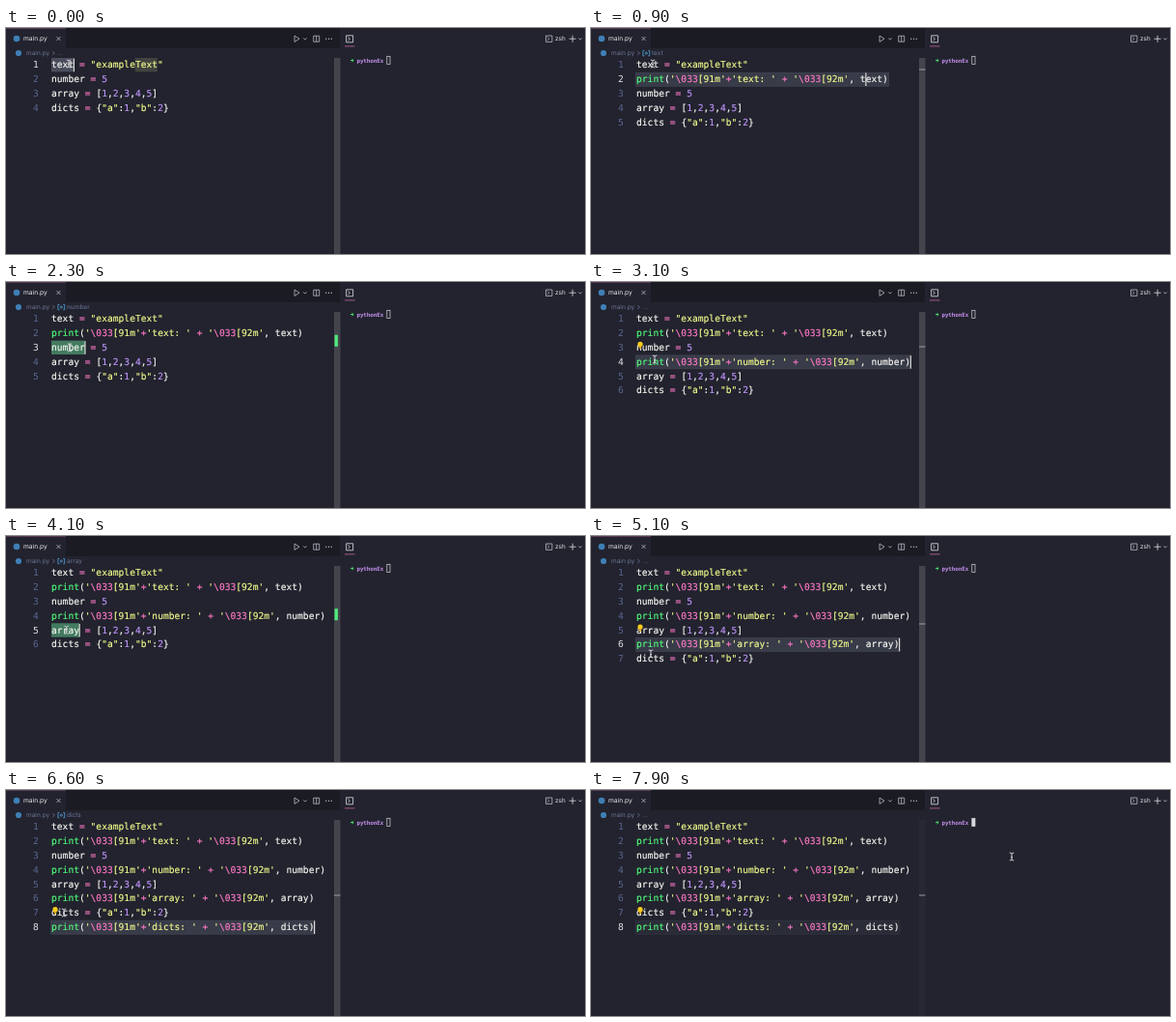
Recreate the animation shown at these times as an HTML page. Size 600 by 234 pixels, loop 8 s.

```html
<!DOCTYPE html>
<html lang="en">
<head>
<meta charset="utf-8">
<title>Editor print helper</title>
<style>
html, body { margin: 0; width: 100%; height: 100%; overflow: hidden; background: #22232e; }
svg { display: block; width: 600px; height: 234px; }
text { white-space: pre; text-rendering: geometricPrecision; }
.code { font: 9.63px "DejaVu Sans Mono", monospace; stroke-width: .15; }
.ui { font: 6.7px Inter, "Open Sans", sans-serif; fill: #e4e4e8; }
.dim { font-size: 6.5px; fill: #6c7497; }
.term { font: bold 5.8px "DejaVu Sans Mono", monospace; fill: #c792f0; }
.icon { fill: none; stroke: #b9bac4; stroke-width: .8; }
</style>
</head>
<body>
<svg id="stage" viewBox="0 0 600 234">
  <rect width="600" height="234" fill="#22232e"/>
  <rect width="346" height="21" fill="#1a1b23"/>
  <rect width="62" height="21" fill="#22232e"/>
  <rect width="62" height="1" fill="#5c3a55"/>
  <rect id="scroll" x="340" y="31" width="6.5" height="203"/>

  <circle cx="11" cy="11" r="3.3" fill="#3f7fb5"/>
  <text class="ui" x="18" y="13.4">main.py</text>
  <path class="icon" d="M52.5 9l4 4m0-4l-4 4"/>
  <circle cx="13" cy="26" r="3.1" fill="#3f7fb5"/>
  <text class="ui dim" x="21" y="28.3">main.py</text>
  <path class="icon" d="M48.3 24l2 2-2 2" style="stroke:#6c7497"/>
  <text class="ui dim" id="crumb" y="28.3"></text>
  <g id="symbol" fill="none" stroke="#55a5e0" stroke-width=".8">
    <path d="M55.4 23.4h-1.5v5.4h1.5M59.2 23.4h1.5v5.4h-1.5"/>
    <circle cx="57.3" cy="26.1" r="1.1"/>
  </g>

  <g class="icon">
    <path d="M299 8v6.4l5-3.2z"/>
    <path d="M308.2 10.4l1.7 1.7 1.7-1.7"/>
    <path d="M318.7 8.2h6v6h-6zM321.7 8.2v6"/>
    <path d="M352.6 7.8h7v7h-7zM354.5 9.5l1.8 1.8-1.8 1.8" stroke="#e0e0e6"/>
    <path d="M559.5 8h6.4v6.4h-6.4zM561.2 9.6l1.6 1.6-1.6 1.6"/>
    <path d="M583.6 11.2h7M587.1 7.7v7" stroke="#e0e0e6"/>
    <path d="M593.4 10.4l1.7 1.7 1.7-1.7"/>
  </g>
  <g fill="#b9bac4">
    <circle cx="331.7" cy="11.2" r=".7"/><circle cx="334.5" cy="11.2" r=".7"/><circle cx="337.3" cy="11.2" r=".7"/>
  </g>
  <rect x="351" y="18.4" width="10.5" height="1" fill="#a8568a"/>
  <text class="ui" x="569" y="13.4" style="font-size:6.4px">zsh</text>

  <path d="M357 33.6h3m-1.3-1.3l1.4 1.3-1.4 1.3" fill="none" stroke="#50fa7b" stroke-width=".9"/>
  <text class="term" x="363.4" y="35.7">pythonEx</text>
  <rect id="prompt" x="394.8" y="29.3" width="3.2" height="8.2" stroke="#d8d8dc" stroke-width=".7"/>

  <rect id="line" x="46.5" height="14" stroke-width=".6"/>
  <rect id="twin" x="133.7" y="31" width="23.1" height="14.4" fill="#41443f"/>
  <rect id="pick" x="47" height="14.4"/>
  <rect id="mark" x="340.5" width="3.4" height="12" fill="#50e87c"/>
  <rect id="tick" x="340" width="6.5" height="1" fill="#9c9ca2"/>
  <g id="rows"></g>
  <rect id="caret" width="1" height="13.6" fill="#f8f8f2"/>
  <g id="bulb">
    <circle r="2.6" fill="#ffcc1a"/>
    <rect x="-1.2" y="2.2" width="2.4" height="2.4" fill="#d9a614"/>
  </g>
  <path id="mouse" fill="none" stroke="#d4d4d8" stroke-width="1"
    d="M-2.2-4q1.7 0 2.2 1q.5-1 2.2-1M0-3v6M-2.2 4q1.7 0 2.2-1q.5 1 2.2 1M-1 .8h2"/>
</svg>
<script>
const LOOP = 8000, STEP = 100, LEFT = 47, TOP = 31, PITCH = 14.83, CHAR = 5.797, BASE = 10.2;
const TERMINAL_FOCUS = 7700;
const PINK = '#ff79c6', YELLOW = '#f1fa8c', PURPLE = '#bd93f9', GREEN = '#50fa7b', WHITE = '#f8f8f2';

// times: selected, named in the path bar, highlighted, printed, path bar reset, bulb
const vars = [
  { name: 'text', value: '"exampleText"', at: [0, 100, 300, 900, 1100, 1300], tick: 43 },
  { name: 'number', value: '5', at: [2000, 2100, 2300, 2800, 3000, 3100], tick: 67 },
  { name: 'array', value: '[1,2,3,4,5]', at: [3800, 3900, 4100, 4600, 4800, 4900], tick: 91 },
  { name: 'dicts', value: '{"a":1,"b":2}', at: [5500, 5600, 5800, 6400, 6700, 6600], tick: 109 }
];

const mousePath = [
  [0, 65, 37], [400, 65, 37], [500, 64, 37], [1400, 64, 37], [1900, 66, 68], [2900, 66, 68],
  [3100, 66, 80], [3700, 63, 97], [4800, 62, 98], [5100, 62, 122], [5400, 60, 127],
  [7000, 60, 127], [7600, 436, 69], [8000, 436, 69]
];

const $ = id => document.getElementById(id);
const set = (el, attrs) => { for (const k in attrs) el.setAttribute(k, attrs[k]); };
const show = (el, on) => { el.style.display = on ? '' : 'none'; };
const rowTop = i => TOP + i * PITCH;

function add(parent, tag, attrs, content = '') {
  const el = document.createElementNS('http://www.w3.org/2000/svg', tag);
  set(el, attrs);
  el.textContent = content;
  return parent.appendChild(el);
}

function tokenColor(s) {
  if (s[0] === '\\' || s === '+' || s === '=') return PINK;
  if (/^['"]/.test(s)) return YELLOW;
  if (s === 'print') return GREEN;
  return /^\d+$/.test(s) ? PURPLE : WHITE;
}

function addCode(source) {
  const row = add($('rows'), 'text', { class: 'code', x: LEFT });
  for (const part of source.match(/'[^']*'|"[^"]*"|\w+|[^\w'"]/g)) {
    const quoted = /^['"]/.test(part);
    const pieces = quoted ? part.split(/(\\\d{3})/) : [part];
    for (const s of pieces) {
      const color = quoted && s[0] !== '\\' ? YELLOW : tokenColor(s);
      if (s) add(row, 'tspan', { fill: color, stroke: color }, s);
    }
  }
  return row;
}

for (const v of vars) {
  const call = `print('\\033[91m'+'${v.name}: ' + '\\033[92m', ${v.name})`;
  v.row = addCode(`${v.name} = ${v.value}`);
  v.call = addCode(call);
  v.end = LEFT + call.length * CHAR;
}

const numbers = Array.from({ length: 8 }, (_, i) =>
  add($('rows'), 'text', { class: 'code', x: 33.8, y: rowTop(i) + BASE, 'text-anchor': 'end' }, i + 1));

function mouseAt(t) {
  const i = mousePath.findIndex(p => p[0] > t);
  const [t0, x0, y0] = mousePath[i - 1], [t1, x1, y1] = mousePath[i];
  const u = (t - t0) / (t1 - t0), e = u * u * (3 - 2 * u);
  return [x0 + (x1 - x0) * e, y0 + (y1 - y0) * e];
}

function draw(t) {
  let count = 0;
  for (const v of vars) {
    const printed = t >= v.at[3];
    set(v.row, { y: rowTop(count++) + BASE });
    show(v.call, printed);
    if (printed) set(v.call, { y: rowTop(count++) + BASE });
  }

  const index = vars.findLastIndex(v => t >= v.at[0]);
  const v = vars[index];
  const [, named, lit, printed, reset, bulb] = v.at;
  const isPrinted = t >= printed, isLit = t >= lit && !isPrinted;
  const active = index * 2 + (isPrinted ? 1 : 0);
  const away = t >= TERMINAL_FOCUS;

  numbers.forEach((n, i) => {
    show(n, i < count);
    set(n, { fill: i === active ? '#e0e1e6' : '#5a6690' });
  });

  const inVar = t >= named && t < reset;
  $('crumb').textContent = inVar ? v.name : '...';
  set($('crumb'), { x: inVar ? 63 : 53.5 });
  show($('symbol'), inVar);

  const wordEnd = LEFT + v.name.length * CHAR;
  show($('pick'), !isPrinted);
  set($('pick'), { y: rowTop(active), width: wordEnd - LEFT, fill: isLit ? '#437b60' : '#4a4d5c' });
  show($('twin'), index === 0 && t < lit);

  const scale = 203 / (203 + (count - 1) * PITCH);
  show($('mark'), isLit);
  set($('mark'), { y: TOP + active * PITCH * scale + .8 });
  show($('tick'), isPrinted);
  set($('tick'), { y: v.tick - .5 });
  set($('scroll'), { fill: away ? '#272833' : '#44454c' });

  show($('line'), isPrinted);
  set($('line'), {
    y: rowTop(active) + .4,
    width: v.end - LEFT + 1,
    fill: away ? '#2a2c38' : '#383b48',
    stroke: away ? '#343744' : '#464957'
  });

  const gliding = isPrinted && t < printed + STEP;
  const caretX = !isPrinted ? wordEnd : gliding ? v.end - 4 * CHAR : v.end;
  show($('caret'), !away);
  set($('caret'), { x: caretX - .3, y: rowTop(active) + .6 });

  show($('bulb'), t >= bulb);
  set($('bulb'), { transform: `translate(51 ${rowTop(index * 2) + 3.7})` });
  set($('prompt'), { fill: away ? '#d8d8dc' : 'none' });
  set($('mouse'), { transform: `translate(${mouseAt(t).join(' ')})` });
}

function tick() {
  const t = performance.now() % LOOP;
  draw(Math.floor(t / STEP) * STEP);
  requestAnimationFrame(tick);
}
tick();
</script>
</body>
</html>
```
